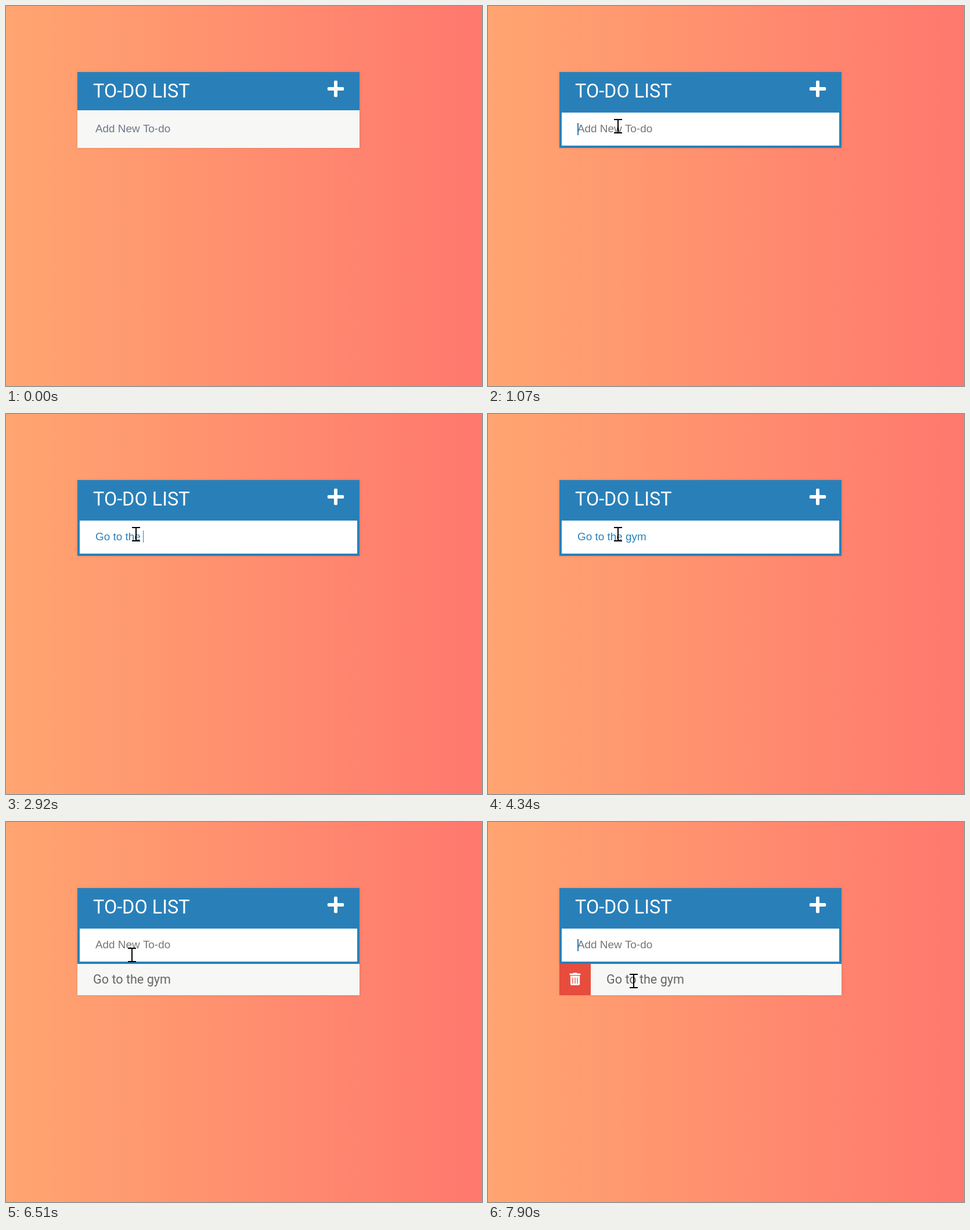
Recreate the animation shown at these times as an HTML page with a canvas. Size 820 by 656 pixels, loop 8 s.

```html
<!DOCTYPE html>
<html lang="en">
<head>
<meta charset="utf-8">
<title>To-do list</title>
<style>
  html, body { margin: 0; width: 100%; height: 100%; overflow: hidden; }
  canvas { display: block; }
</style>
</head>
<body>
<canvas id="stage" width="820" height="656"></canvas>
<script>
const ctx = document.getElementById('stage').getContext('2d');
const LOOP = 8000;
const LEFT = 123, WIDTH = 486, TOP = 114;
const BLUE = '#2980b9', PANEL = '#f7f7f6';
const INPUT_FONT = '18.9px "Liberation Sans", Arial, sans-serif';
const ITEM_FONT = '21.6px Roboto, sans-serif';
const TITLE_FONT = '32.4px Roboto, sans-serif';

const TRASH = new Path2D(
  'M32 464a48 48 0 0 0 48 48h288a48 48 0 0 0 48-48V128H32z' +
  [304, 208, 112].map(x => `M${x} 208a16 16 0 0 1 32 0v224a16 16 0 0 1-32 0z`).join('') +
  'M432 32H312l-9-19a24 24 0 0 0-22-13H167a24 24 0 0 0-22 13L136 32H16' +
  'A16 16 0 0 0 0 48v32a16 16 0 0 0 16 16h416a16 16 0 0 0 16-16V48a16 16 0 0 0-16-16z');
const ARROW = new Path2D('M.5 .5V24L6 18.8L9.8 27L13.2 25.5L9.7 17.5H17.3Z');

const arrow = (x, y) => ({ pointer: 'arrow', x, y });
const beam = (x, y) => ({ pointer: 'beam', x, y });
const type = text => ({ text, caret: true });
const caret = on => ({ caret: on });

// Each step changes part of the state, which then holds until the next step.
const steps = [
  [0, { pointer: null, x: 0, y: 0, focus: false, caret: false, text: '', item: false, reveal: 0 }],
  [290, arrow(231, 259)],
  [450, beam(222, 213)],
  [600, beam(219, 172)],
  [760, beam(217, 185)],
  [910, beam(217, 195)],
  [1070, { focus: true, caret: true }],
  [1540, caret(false)],
  [1690, type('G')],
  [1850, type('Go')],
  [2000, type('Go ')],
  [2150, type('Go t')],
  [2310, type('Go to')],
  [2460, type('Go to ')],
  [2610, type('Go to t')],
  [2760, type('Go to the')],
  [2920, type('Go to the ')],
  [3380, type('Go to the g')],
  [3700, type('Go to the gym')],
  [4340, caret(false)],
  [4490, { text: '', caret: true, item: true }],
  [5100, caret(false)],
  [5570, caret(true)],
  [5740, beam(219, 200)],
  [6050, caret(false)],
  [6510, beam(210, 217)],
  [6660, { ...beam(203, 258), caret: true, reveal: 0.4 }],
  [6800, { ...arrow(207, 295), reveal: 1 }],
  [6980, arrow(208, 293)],
  [7130, { ...arrow(212, 290), caret: false }],
  [7290, arrow(222, 287)],
  [7450, beam(227, 275)],
  [7590, { ...beam(236, 271), caret: true }],
  [7740, beam(242, 265)],
  [7900, beam(244, 262)],
];

const stateAt = time =>
  Object.assign({}, ...steps.filter(([start]) => start <= time).map(([, change]) => change));

function box(x, y, w, h, color) {
  ctx.fillStyle = color;
  ctx.fillRect(x, y, w, h);
}

function label(text, x, baseline, font, color) {
  ctx.font = font;
  ctx.fillStyle = color;
  ctx.fillText(text, x, baseline);
}

function drawBackground() {
  const gradient = ctx.createLinearGradient(0, 0, 820, 0);
  gradient.addColorStop(0, '#ffa570');
  gradient.addColorStop(1, '#ff786e');
  box(0, 0, 820, 656, gradient);
}

function drawPanel(height) {
  ctx.save();
  ctx.shadowColor = 'rgba(0, 0, 0, .12)';
  ctx.shadowBlur = 4;
  box(LEFT, TOP, WIDTH, height, PANEL);
  ctx.restore();
}

function drawHeader() {
  box(LEFT, TOP, WIDTH, 66, BLUE);
  label('TO-DO LIST', 150, 158, TITLE_FONT, '#fff');
  ctx.beginPath();
  ctx.roundRect(553.8, 140, 28.4, 6, 2);
  ctx.roundRect(565, 128.8, 6, 28.4, 2);
  ctx.fill();
}

function drawInput({ focus, text, caret }) {
  if (focus) {
    box(LEFT, 180, WIDTH, 65, BLUE);
    box(127, 184, 478, 57, '#fff');
  }
  if (text) label(text, 154, 218, INPUT_FONT, BLUE);
  else label('Add New To-do', 154, 218, INPUT_FONT, focus ? '#757575' : '#6c7887');
  if (!caret) return;
  if (text) box(Math.floor(153.5 + ctx.measureText(text).width), 201, 1, 21, BLUE);
  else box(154, 202, 2, 21, BLUE);
}

function drawItem(reveal) {
  const width = 54 * reveal;
  ctx.save();
  ctx.globalAlpha = reveal;
  box(LEFT, 245, width, 54, '#e74c3c');
  ctx.translate(LEFT + width / 2 - 9.45, 260.2);
  ctx.scale(0.0422, 0.0422);
  ctx.fillStyle = '#fff';
  ctx.fill(TRASH, 'evenodd');
  ctx.restore();
  label('Go to the gym', 150 + width, 279, ITEM_FONT, '#666');
}

function drawPointer({ pointer, x, y }) {
  ctx.save();
  ctx.translate(x, y);
  if (pointer === 'beam') {
    box(0, 0, 14, 2, '#000');
    box(6, 0, 2, 25, '#000');
    box(0, 23, 14, 2, '#000');
  } else if (pointer === 'arrow') {
    ctx.fillStyle = '#fff';
    ctx.strokeStyle = '#000';
    ctx.lineWidth = 1.2;
    ctx.fill(ARROW);
    ctx.stroke(ARROW);
  }
  ctx.restore();
}

function draw(now) {
  const state = stateAt(now % LOOP);
  drawBackground();
  drawPanel(state.item ? 185 : 131);
  drawHeader();
  drawInput(state);
  if (state.item) drawItem(state.reveal);
  drawPointer(state);
  requestAnimationFrame(draw);
}
requestAnimationFrame(draw);
</script>
</body>
</html>
```
